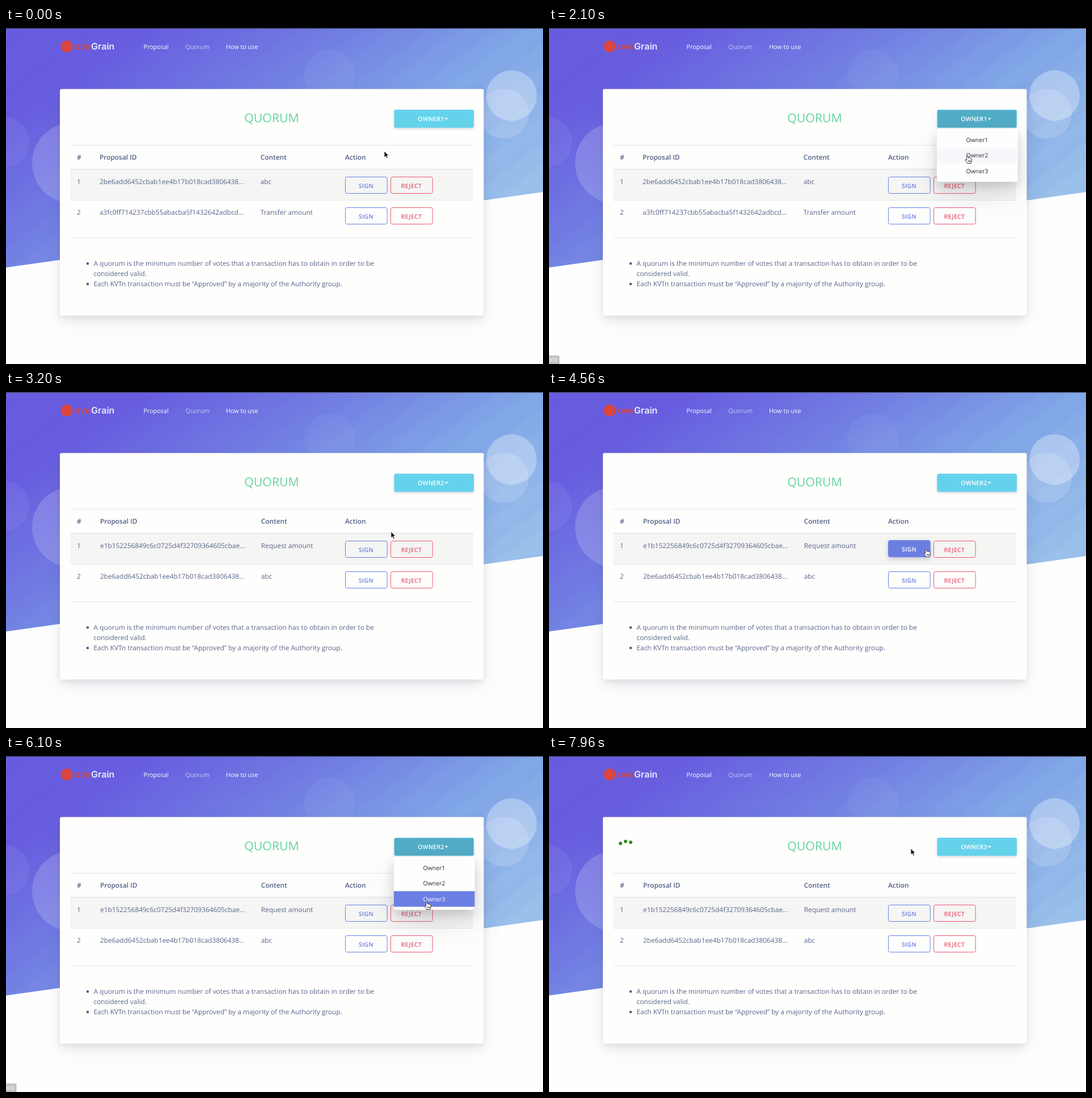
Write an HTML page that moves like this. It is 947x592 px and loops after 8000 ms.

```html
<!DOCTYPE html>
<html lang="en">
<head>
<meta charset="utf-8">
<title>Quorum</title>
<style>
  html, body { margin: 0; width: 100%; height: 100%; overflow: hidden; background: #fefefe; }
  svg { display: block; width: 947px; height: 592px; }
  text { font: 11.88px "Open Sans", sans-serif; fill: #5a668a; white-space: pre; text-rendering: geometricPrecision; }
  .nav text { font-size: 10.8px; fill: #fff; }
  .brand text { font: 600 16px Inter, sans-serif; }
  .head text { font-weight: 600; fill: #525f85; }
  .mid { text-anchor: middle; }
  .btn { font-size: 10.5px; font-weight: 600; letter-spacing: .26px; text-anchor: middle; }
  .item { font-size: 10.5px; fill: #24282c; text-anchor: middle; }
  .card { filter: drop-shadow(0 11px 13px rgba(50,50,93,.1)) drop-shadow(0 4px 5px rgba(0,0,0,.07)); }
  .lift { filter: drop-shadow(0 2px 2px rgba(50,50,93,.2)); }
  .menu { filter: drop-shadow(0 24px 30px rgba(50,50,93,.1)) drop-shadow(0 8px 10px rgba(0,0,0,.16)); }
</style>
</head>
<body>
<svg viewBox="0 0 947 592">
  <defs>
    <linearGradient id="sky" gradientUnits="userSpaceOnUse" x1="71" y1="109" x2="415" y2="630">
      <stop offset="0" stop-color="#685cdf"/>
      <stop offset=".34" stop-color="#7381e3"/>
      <stop offset=".62" stop-color="#82a9e7"/>
      <stop offset="1" stop-color="#9ec4eb"/>
    </linearGradient>
    <linearGradient id="streaks" gradientUnits="userSpaceOnUse" x1="0" y1="0" x2="42" y2="56" spreadMethod="repeat">
      <stop offset="0" stop-color="#4a52d8" stop-opacity="0"/>
      <stop offset=".35" stop-color="#4a52d8" stop-opacity=".06"/>
      <stop offset=".5" stop-color="#4a52d8" stop-opacity=".01"/>
      <stop offset=".75" stop-color="#4a52d8" stop-opacity=".04"/>
      <stop offset="1" stop-color="#4a52d8" stop-opacity="0"/>
    </linearGradient>
    <clipPath id="hero"><path d="M0 0H947V289L0 422Z"/></clipPath>
  </defs>

  <g clip-path="url(#hero)">
    <rect width="947" height="430" fill="url(#sky)"/>
    <rect width="947" height="430" fill="url(#streaks)"/>
    <g fill="#fff">
      <circle cx="-3" cy="201" r="44" opacity=".06"/>
      <circle cx="117" cy="238" r="71" opacity=".17"/>
      <circle cx="571" cy="83" r="45" opacity=".045"/>
      <circle cx="878" cy="151" r="44" opacity=".16"/>
      <circle cx="891.5" cy="119" r="44.5" opacity=".3"/>
    </g>
    <rect width="947" height="1.2" fill="#3b3d4b"/>
  </g>

  <g class="brand">
    <circle cx="107" cy="32.5" r="10.5" fill="#dc4640"/>
    <text x="121" y="38" style="fill:#dc4640">ove</text>
    <text x="150" y="38" style="fill:#e9ebfb">Grain</text>
  </g>
  <g class="nav">
    <text x="242.5" y="37">Proposal</text>
    <text x="316.5" y="37" opacity=".65">Quorum</text>
    <text x="388" y="37">How to use</text>
  </g>

  <rect class="card" x="95" y="107.5" width="747.5" height="399" rx="3" fill="#fefefd"/>
  <text class="mid" x="468.5" y="165.5" style="font-size:21.3px;font-weight:500;fill:#67d29f">QUORUM</text>
  <g id="dots" fill="#2f8a24">
    <circle cx="126" r="3"/><circle cx="135" r="3"/><circle cx="144" r="3"/>
  </g>

  <rect x="113" y="249" width="711" height="54" fill="#f5f5f4"/>
  <g fill="#e3e5e8">
    <rect x="113" y="206" width="711" height="1"/>
    <rect x="113" y="248" width="711" height="1.5"/>
    <rect x="113" y="303" width="711" height="1"/>
    <rect x="113" y="369" width="711" height="1"/>
  </g>
  <g class="head">
    <text x="125" y="232">#</text>
    <text class="c1" y="232">Proposal ID</text>
    <text class="c2" y="232">Content</text>
    <text x="598" y="232">Action</text>
  </g>
  <g id="rows"></g>

  <circle cx="144" cy="415" r="2.3" fill="#525f7f"/>
  <circle cx="144" cy="451" r="2.3" fill="#525f7f"/>
  <text x="154.5" y="419">A quorum is the minimum number of votes that a transaction has to obtain in order to be</text>
  <text x="154.5" y="437">considered valid.</text>
  <text x="154.5" y="454.5">Each KVTn transaction must be “Approved” by a majority of the Authority group.</text>

  <g id="picker">
    <rect class="lift" x="684.5" y="144" width="140.5" height="31.7" rx="3" fill="#65d2ec"/>
    <rect id="shade" x="685.2" y="144.8" width="139" height="30.2" rx="2" fill="#52adc7"/>
    <text id="who" class="btn" x="749.5" y="164" style="fill:#fff"></text>
    <path d="M773.5 158.5h6.4l-3.2 3.2z" fill="#fff"/>
  </g>
  <g id="menu">
    <rect class="menu" x="684" y="177" width="142.5" height="94" rx="3" fill="#fefefe"/>
    <rect id="mark" x="684" width="142.5" height="27.4"/>
  </g>

  <g id="status">
    <path d="M0 577H15.5a3 3 0 0 1 3 3V592H0Z" fill="#3a3b3e"/>
    <text x="-2" y="588" style="font-size:9.5px;fill:#fff">d(0)</text>
  </g>

  <g id="arrow"><path d="M0 0V11L2.6 8.7 4.4 12.7 6.3 11.9 4.6 8H8Z" fill="#111" stroke="#fff" stroke-width=".8"/></g>
  <g id="hand"><path d="M-1.4 .8C-1.4-.6 .8-.6 .9 .8L1.2 4C2 3.2 3.2 3.5 3.5 4.3 4.5 3.8 5.3 4.2 5.6 5 6.7 4.6 7.7 5.2 7.6 6.4L7.2 10 6 13.5H-.2L-1.2 11.5-4 8C-4.5 6.8-3.2 6.2-2.3 7L-1.2 8ZM1.7 8.3V11M3.5 8.3V11M5.3 8.3V11" fill="#fff" stroke="#222" stroke-width=".9" stroke-linejoin="round"/></g>
</svg>
<script>
const LOOP = 8000;
const $ = id => document.getElementById(id);
const clamp = v => Math.max(0, Math.min(1, v));
const set = (el, attrs) => { for (const k in attrs) el.setAttribute(k, attrs[k]); };
const move = (el, x, y) => set(el, { transform: `translate(${x} ${y})` });

function add(parent, tag, attrs, text = '') {
  const el = document.createElementNS('http://www.w3.org/2000/svg', tag);
  set(el, attrs);
  el.textContent = text;
  return parent.appendChild(el);
}

// time, x, y of the pointer's hot spot
const PATH = [
  [0, 667, 217], [200, 667, 217], [360, 666, 216], [660, 666, 216],
  [1460, 745, 166], [1500, 745, 166], [1930, 738, 225], [2480, 738, 225],
  [2860, 695, 206], [2960, 695, 206], [3200, 679, 246], [3560, 665, 277],
  [4560, 665, 277], [5080, 748, 165], [5400, 748, 165], [5930, 742, 257],
  [6260, 742, 257], [6900, 676, 255], [6930, 676, 255], [7030, 672, 266],
  [7230, 665, 277], [7480, 665, 277], [7960, 638, 163], [LOOP, 638, 163]
];

// [on, off] times of each state
const OPEN = [[1500, 2450], [5150, 6220]];
const PRESS = [[2370, 2450], [6100, 6220]];
const STATUS = [[2100, 2450], [6100, 6220]];
const SIGN = [[3440, 4610], [7030, 7540]];
const PICK = [[1230, 1500], [4930, 5150]];
const HAND = [[1230, 2500], [3440, 4610], [4930, 6320], [7020, 7540]];
const SWITCH = [2470, 6240];
const SPIN_START = 7560;

const HASH = {
  transfer: 'a3fc0ff714237cbb55abacba5f1432642adbcd...',
  request: 'e1b152256849c6c0725d4f32709364605cbae...',
  abc: '2be6add6452cbab1ee4b17b018cad3806438...'
};
const LISTS = [
  [[HASH.abc, 'abc'], [HASH.transfer, 'Transfer amount']],
  [[HASH.request, 'Request amount'], [HASH.abc, 'abc']]
];

const within = (spans, t) => spans.some(([a, b]) => t >= a && t < b);
const fade = (spans, t, ms = 150) =>
  Math.max(...spans.map(([a, b]) => clamp((t - a) / ms) * (1 - clamp((t - b) / ms))));

// Hermite curve that rests wherever the pointer is held
function slope(i, k) {
  const [a, b, c] = [PATH[i - 1], PATH[i], PATH[i + 1]];
  const held = (p, q) => !p || !q || (p[1] === q[1] && p[2] === q[2]);
  return held(a, b) || held(b, c) ? 0 : (c[k] - a[k]) / (c[0] - a[0]);
}
function pointer(t) {
  const i = Math.max(0, PATH.findIndex(p => p[0] > t) - 1);
  const p = PATH[i], q = PATH[i + 1], d = q[0] - p[0], u = (t - p[0]) / d;
  const ease = u * u * (3 - 2 * u);
  return [1, 2].map(k => p[k] + (q[k] - p[k]) * ease
    + d * u * (1 - u) * ((1 - u) * slope(i, k) - u * slope(i + 1, k)));
}

function outline(x, y, label, color) {
  const g = add($('rows'), 'g', {});
  const box = add(g, 'rect', {
    x: x + .5, y: y + .5, width: 73.7, height: 29, rx: 3,
    fill: color, 'fill-opacity': 0, stroke: color
  });
  const text = add(g, 'text', { class: 'btn', x: x + 37, y: y + 19.8, style: `fill:${color}` }, label);
  return { g, box, text };
}

const rows = [0, 1].map(i => {
  const y = 275 + 54 * i;
  add($('rows'), 'text', { x: 125, y }, i + 1);
  const cells = ['c1', 'c2'].map(c => add($('rows'), 'text', { class: c, y }));
  const sign = outline(598, y - 13, 'SIGN', '#6b7fe3');
  outline(678, y - 13, 'REJECT', '#ec5773');
  return { cells, sign };
});
const items = [1, 2, 3].map(n =>
  add($('menu'), 'text', { class: 'item', x: 755, y: 173.6 + 27.4 * n }, 'Owner' + n));
const dots = [...$('dots').children];
const columns = ['c1', 'c2'].map(c => [...document.querySelectorAll('.' + c)]);
let shownList = -1;

function showList(n) {
  if (n === shownList) return;
  shownList = n;
  LISTS[n].forEach((row, i) => row.forEach((s, c) => rows[i].cells[c].textContent = s));
  columns.forEach((col, c) => col.forEach(el => set(el, { x: [165, 448.7][c] + n })));
}

function render(t) {
  const [x, y] = pointer(t);
  const hand = within(HAND, t);
  move($('arrow'), x, y);
  move($('hand'), x, y);
  set($('arrow'), { opacity: hand ? 0 : 1 });
  set($('hand'), { opacity: hand ? 1 : 0 });

  const switches = SWITCH.filter(s => t >= s).length;
  showList(Math.min(switches, 1));
  $('who').textContent = 'OWNER' + (switches + 1);
  move($('picker'), 0, -fade(PICK, t));
  set($('shade'), { opacity: fade(OPEN, t) });

  set($('menu'), { opacity: within(OPEN, t) ? fade(OPEN, t, 100) : 0 });
  const over = Math.floor((y - 183.4) / 27.4);
  const pressed = within(PRESS, t);
  set($('mark'), {
    y: 183.4 + 27.4 * over,
    fill: pressed ? '#6b7fe3' : '#f7f8fc',
    opacity: over >= 0 && over < 3 ? 1 : 0
  });
  items.forEach((el, i) => el.style.fill = pressed && i === over ? '#fff' : '#24282c');
  set($('status'), { opacity: within(STATUS, t) ? .3 + .7 * fade(STATUS, t) : 0 });

  const { g, box, text } = rows[0].sign;
  const lit = fade(SIGN, t);
  move(g, 0, -lit);
  set(box, { 'fill-opacity': lit });
  g.style.filter = lit ? `drop-shadow(0 3px 4px rgba(50,50,93,${.25 * lit}))` : 'none';
  text.style.fill = lit > .4 ? '#fff' : '#6b7fe3';

  set($('dots'), { opacity: t >= SPIN_START ? 1 : 0 });
  dots.forEach((el, i) =>
    set(el, { cy: 152.3 + 2 * Math.sin(2.13 + 2 * i + (t - 7960) / 95) }));
}

const start = performance.now();
function tick() {
  render((performance.now() - start) % LOOP);
  requestAnimationFrame(tick);
}
tick();
</script>
</body>
</html>
```
